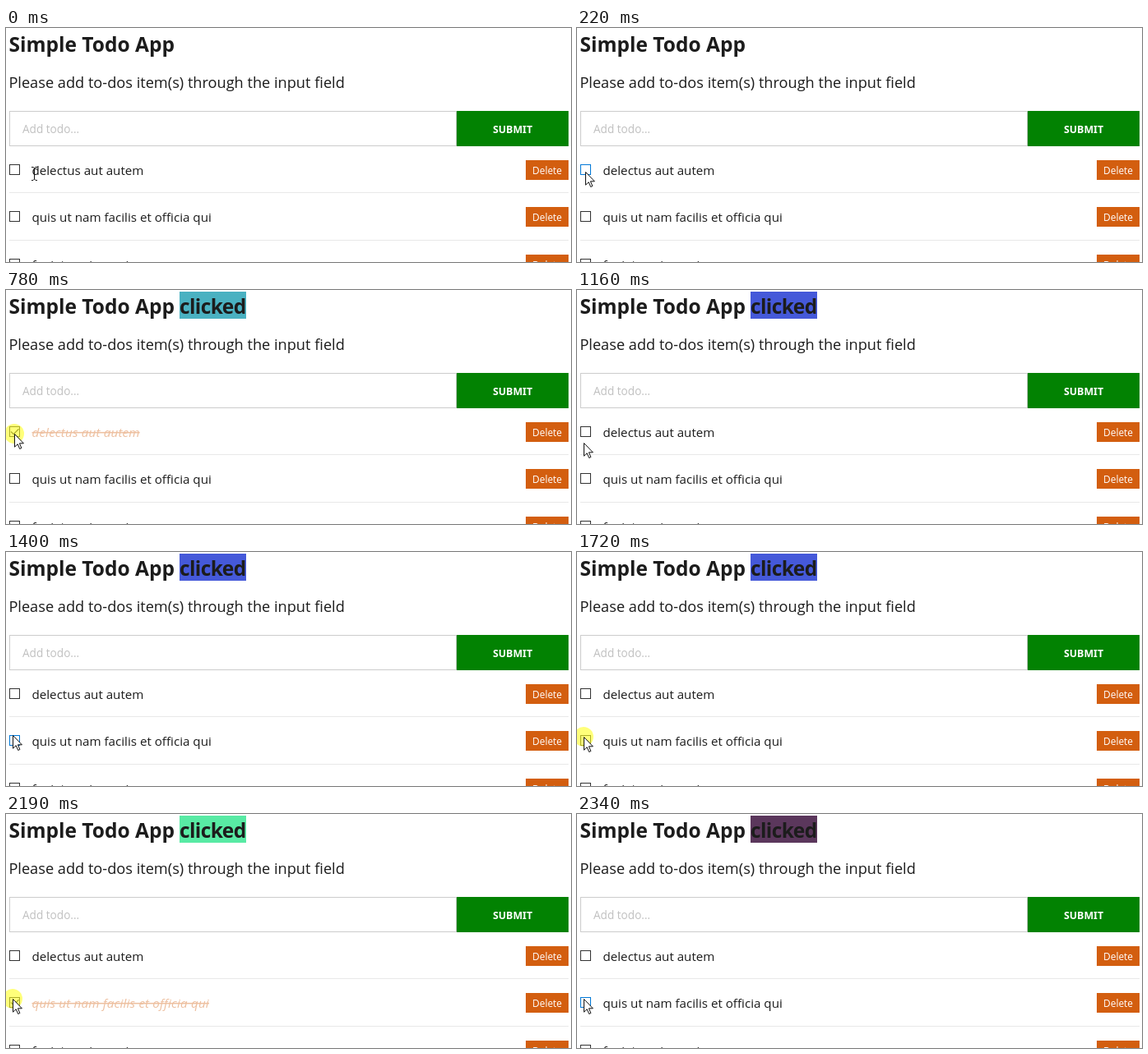
Recreate the animation shown at these times as an HTML page. Size 687x285 px, loop 2.66 s.

```html
<!DOCTYPE html>
<html lang="en">
<head>
<meta charset="utf-8">
<title>Todo list</title>
<style>
  html, body { margin: 0; width: 100%; height: 100%; overflow: hidden; background: #fff; }
  svg { display: block; width: 687px; height: 285px; }
  text { font-family: "Open Sans", "Noto Sans", sans-serif; font-variant-ligatures: none; fill: #1c1c1c; white-space: pre; }
  .title { font-size: 24.5px; font-weight: 700; }
  .lead { font-size: 18.18px; }
  .hint { font-size: 13.6px; fill: #c0c0c0; }
  .submit { font: 700 12.4px "Noto Sans", "Open Sans", sans-serif; fill: #fff; }
  .item { font-size: 15.17px; }
  .item.done { font-style: italic; letter-spacing: .2px; fill: #edbf9f; text-decoration: line-through; }
  .delete { font-size: 11.9px; fill: #fff; }
</style>
</head>
<body>
<svg viewBox="0 0 687 285">
  <rect width="687" height="285" fill="#fff"/>
  <rect id="mark" x="211" y="2" width="81" height="33"/>
  <text class="title" x="3.5" y="29">Simple Todo App</text>
  <text class="title" id="clicked" x="211" y="29" letter-spacing="-.6">clicked</text>
  <text class="lead" x="3.4" y="73">Please add to-dos item(s) through the input field</text>
  <rect x="4.5" y="101.5" width="543" height="42" fill="#fff" stroke="#ccc"/>
  <text class="hint" x="20" y="128">Add todo...</text>
  <rect x="548" y="101" width="136" height="43" fill="#028202"/>
  <text class="submit" x="616" y="128" text-anchor="middle">SUBMIT</text>
  <path d="M4 200.5H684M4 258.5H684" stroke="#e8e8e8"/>
  <g id="rows"></g>
  <circle id="press" r="12" fill="#ff0" fill-opacity=".52"/>
  <path id="arrow" d="M.5 .5V16.2L4.2 12.7 6.7 18.5 8.9 17.5 6.4 11.8H11.4Z" fill="#fff" stroke="#111"/>
  <path id="beam" d="M-3 .5H-1L.5 1.5 2 .5H4M.5 1.5V15M-3 16.5H-1L.5 15 2 16.5H4" fill="none" stroke="#111"/>
</svg>
<script>
  const LOOP = 2660;
  const DARK = '#333', BLUE = '#0078d7', PRESSED = '#555';
  const byId = id => document.getElementById(id);
  const show = (el, on) => el.setAttribute('visibility', on ? 'visible' : 'hidden');
  const moveTo = (el, x, y) => el.setAttribute('transform', `translate(${x} ${y})`);

  function makeRow(label, y) {
    const g = document.createElementNS('http://www.w3.org/2000/svg', 'g');
    moveTo(g, 0, y);
    g.innerHTML = `
      <rect class="box" x="4.5" y="166.5" width="12" height="12" fill="#fff"/>
      <path class="tick" d="M6 172.5L9.2 175.7 15.5 169.3" fill="none" stroke-width="1.3"/>
      <text class="item" x="31.5" y="179">${label}</text>
      <rect x="632" y="161" width="52" height="24" fill="#d35e0f"/>
      <text class="delete" x="658" y="178" text-anchor="middle">Delete</text>`;
    byId('rows').append(g);
    const [box, tick, text] = ['.box', '.tick', '.item'].map(s => g.querySelector(s));

    return (done, px, py, pressed) => {
      const top = 166 + y;
      const hover = px >= 4 && px < 17 && py >= top && py < top + 13;
      const colour = !hover ? DARK : pressed ? PRESSED : BLUE;
      box.setAttribute('stroke', colour);
      tick.setAttribute('stroke', colour);
      show(tick, done);
      text.classList.toggle('done', done);
    };
  }

  const rows = [
    makeRow('delectus aut autem', 0),
    makeRow('quis ut nam facilis et officia qui', 57),
    makeRow('fugiat veniam minus', 115)
  ];

  // [start, x, y] of the pointer tip
  const pointer = [
    [0, 34, 176], [70, 25, 175], [145, 16, 175], [220, 10, 175],
    [1160, 8, 186], [1250, 8, 201], [1320, 8, 214], [1400, 8, 223],
    [1570, 8, 224], [1645, 8, 225]
  ];
  // the click takes effect when the button is released
  const clicks = [
    { down: 390, up: 540, row: 0, done: true, colour: '#4ab1c1' },
    { down: 690, up: 860, row: 0, done: false, colour: '#4559d9' },
    { down: 1720, up: 1870, row: 1, done: true, colour: '#58eaa4' },
    { down: 2190, up: 2340, row: 1, done: false, colour: '#5b375c' }
  ];

  function update(t) {
    const [, x, y] = pointer.findLast(p => p[0] <= t);
    const pressed = clicks.some(c => c.down <= t && t < c.up);
    const past = clicks.filter(c => c.up <= t);
    const last = past.at(-1);
    const overText = t < 70;

    show(byId('mark'), last);
    show(byId('clicked'), last);
    if (last) byId('mark').setAttribute('fill', last.colour);

    rows.forEach((draw, i) => {
      const done = past.findLast(c => c.row === i)?.done ?? false;
      draw(done, x, y, pressed);
    });

    show(byId('press'), pressed);
    moveTo(byId('press'), x, y);
    show(byId('arrow'), !overText);
    moveTo(byId('arrow'), x, y);
    show(byId('beam'), overText);
    moveTo(byId('beam'), x, y - 7);
  }

  const start = performance.now();
  function tick(now) {
    update(Math.max(0, now - start) % LOOP);
    requestAnimationFrame(tick);
  }
  update(0);
  requestAnimationFrame(tick);
</script>
</body>
</html>
```
